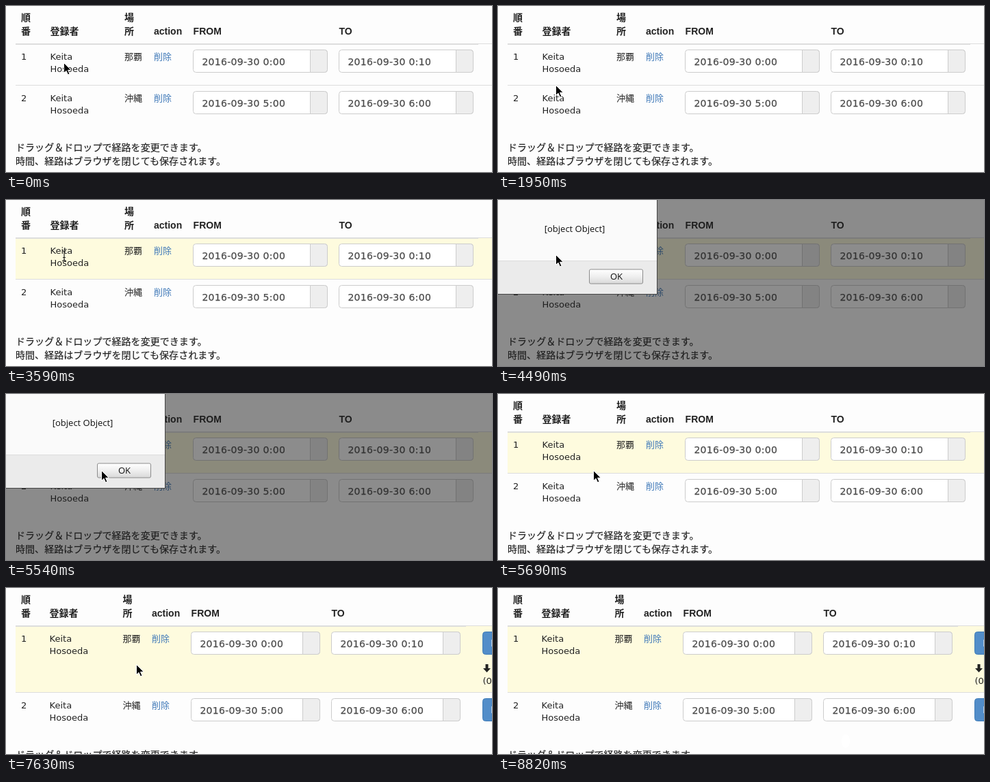
An HTML page for the animation above (9870 ms loop, 710 by 244 pixels).

```html
<!DOCTYPE html>
<html lang="ja">
<head>
<meta charset="utf-8">
<title>経路一覧</title>
<style>
html, body { margin: 0; width: 100%; height: 100%; overflow: hidden; background: #fdfdfd; }
svg { display: block; width: 710px; height: 244px; }
text { fill: #222; font: 13px "DejaVu Sans", "Noto Sans CJK JP", sans-serif; white-space: pre; }
.head { font: bold 14px "Liberation Sans", "Noto Sans CJK JP", sans-serif; }
.ja { font-family: "Noto Sans CJK JP", sans-serif; }
.note { font-size: 14px; letter-spacing: .05px; stroke: #222; stroke-width: .2px; }
.link { fill: #3f79b8; }
.time { fill: #4c4c4c; font-size: 14px; letter-spacing: .3px; stroke: #4c4c4c; stroke-width: .25px; }
.rule { fill: #ddd; }
.field { fill: #fff; stroke: #ccc; }
.addon { fill: #eee; stroke: #ccc; }
.button { fill: #528dc9; stroke: #3f7cb8; }
.mark { fill: #fefbde; }
.dialog text { font: 13px "Open Sans", "Noto Sans CJK JP", sans-serif; fill: #111; text-anchor: middle; }
.dialog .ja { font: 12px "Noto Sans CJK JP", sans-serif; text-anchor: end; }

#narrow, #wide, #narrow .mark, #dim, #first, #second, #cursor, #arrow, #beam, #halo {
  animation: 9870ms step-end infinite;
}
#narrow { animation-name: narrow; }
#wide { animation-name: wide; }
#narrow .mark { animation-name: mark; }
#dim { animation-name: dim; }
#first { animation-name: first; }
#second { animation-name: second; }
#cursor { animation-name: move; }
#arrow { animation-name: arrow; }
#beam { animation-name: beam; }
#halo { animation-name: halo; }

@keyframes narrow { 0% { opacity: 1 } 69.8%, 100% { opacity: 0 } }
@keyframes wide { 0% { opacity: 0 } 69.8%, 100% { opacity: 1 } }
@keyframes mark { 0% { opacity: 0 } 33.33%, 100% { opacity: 1 } }
@keyframes dim {
  0%, 57.64%, 77.3%, 100% { opacity: 0 }
  43.97%, 69.8% { opacity: 1 }
}
@keyframes first { 0%, 57.64%, 100% { opacity: 0 } 43.97% { opacity: 1 } }
@keyframes second { 0%, 77.3%, 100% { opacity: 0 } 69.8% { opacity: 1 } }
@keyframes arrow {
  0%, 16.71%, 40.93% { opacity: 1 }
  12.15%, 34.85%, 89.36%, 100% { opacity: 0 }
}
@keyframes beam {
  0%, 16.71%, 40.93%, 100% { opacity: 0 }
  12.15%, 34.85% { opacity: 1 }
}
@keyframes halo { 0% { opacity: 0 } 89.36%, 100% { opacity: 1 } }
@keyframes move {
  0% { transform: translate(84px, 83px) }
  12.15% { transform: translate(84px, 85px) }
  16.71% { transform: translate(84px, 92px) }
  18.23% { transform: translate(84px, 109px) }
  19.75% { transform: translate(84px, 116px) }
  22.79% { transform: translate(85px, 106px) }
  24.31% { transform: translate(89px, 84px) }
  25.83% { transform: translate(94px, 63px) }
  27.25% { transform: translate(95px, 56px) }
  30.29% { transform: translate(93px, 54px) }
  31.81% { transform: translate(90px, 59px) }
  33.33% { transform: translate(87px, 68px) }
  34.85% { transform: translate(85px, 79px) }
  36.37% { transform: translate(85px, 82px) }
  40.93% { transform: translate(84px, 80px) }
  53.09% { transform: translate(95px, 86px) }
  54.61% { transform: translate(124px, 103px) }
  56.13% { transform: translate(139px, 112px) }
  74.26% { transform: translate(160px, 112px) }
  75.78% { transform: translate(190px, 112px) }
  83.38% { transform: translate(197px, 114px) }
  84.9% { transform: translate(290px, 150px) }
  86.42% { transform: translate(410px, 192px) }
  87.84%, 100% { transform: translate(488px, 212px) }
}
</style>
</head>
<body>
<svg viewBox="0 0 710 244">
  <defs>
    <linearGradient id="face" x2="0" y2="1">
      <stop stop-color="#fff"/><stop offset=".5" stop-color="#efefef"/><stop offset="1" stop-color="#d9d9d9"/>
    </linearGradient>
  </defs>
  <g id="narrow"></g>
  <g id="wide"></g>
  <ellipse id="halo" cx="508" cy="225" rx="6" ry="10" fill="#fff"/>
  <rect id="dim" width="710" height="244" fill="#1a1a1a" fill-opacity=".5"/>
  <g id="first" class="dialog"></g>
  <g id="second" class="dialog"></g>
  <g id="cursor">
    <path id="arrow" d="M.5 .5V15.5L4 12.2 6.5 18 9 17 6.5 11.3H11.2Z" fill="#000" stroke="#fff" stroke-linejoin="round"/>
    <path id="beam" d="M-3-7.5Q0-7.5 0-5.5Q0-7.5 3-7.5M0-6V6M-3 7.5Q0 7.5 0 5.5Q0 7.5 3 7.5M-2 2.5H2" fill="none" stroke="#222" stroke-width="1.2"/>
  </g>
</svg>
<script>
const text = (x, y, s, cls = '') => `<text x="${x}" y="${y}" class="${cls}">${s}</text>`;
const rect = (x, y, w, h, cls, rx = 0) =>
  `<rect x="${x}" y="${y}" width="${w}" height="${h}" rx="${rx}" class="${cls}"/>`;

const rows = [
  { place: '那覇', times: ['2016-09-30 0:00', '2016-09-30 0:10'] },
  { place: '沖縄', times: ['2016-09-30 5:00', '2016-09-30 6:00'] },
];

function field(x, y, width, value) {
  const split = x + width - 26, right = x + width - .5;
  return rect(x + .5, y + .5, width - 1, 33, 'field', 4) +
    `<path class="addon" d="M${split + .5} ${y + .5}H${right - 4}q4 0 4 4v25q0 4-4 4H${split + .5}Z"/>` +
    text(x + 13.4, y + 23, value, 'time');
}

function routeButton(y) {
  return rect(696.5, y + .5, 40, 33, 'button', 4) +
    `<rect x="709" y="${y + 12}" width="1" height="10" fill="#fff" opacity=".6"/>`;
}

function page({ name, place, action, fields, width, rowHeight, ruleEnd, buttons }) {
  const bottom = 55 + rowHeight;
  let out = rect(14, 56, 696, rowHeight - 1, 'mark') +
    rect(14, 55, ruleEnd - 14, 2, 'rule') +
    rect(ruleEnd, 55, 710 - ruleEnd, 1, 'rule') +
    rect(14, bottom, 696, 1, 'rule');

  const heads = [[22, 22, '順'], [22, 42, '番'], [name, 42, '登録者'], [place, 22, '場'], [place, 42, '所'],
    [action, 42, 'action'], [fields[0] + .6, 42, 'FROM'], [fields[1] + .4, 42, 'TO']];
  out += heads.map(([x, y, s]) => text(x, y, s, 'head')).join('');

  rows.forEach((row, i) => {
    const top = i * rowHeight;
    out += text(22, top + 79, i + 1) +
      text(name, top + 79, 'Keita') + text(name, top + 97, 'Hosoeda') +
      text(place, top + 79, row.place, 'ja') +
      text(action, top + 79, '削除', 'ja link') +
      row.times.map((t, k) => field(fields[k], top + 64, width, t)).join('');
    if (buttons) out += routeButton(top + 64);
  });

  if (buttons) {
    out += '<path d="M700.5 112h4v6h3.5l-5.5 6-5.5-6h3.5Z" fill="#222"/>' + text(696.5, 141, '(0分)');
  }
  return out +
    text(14, bottom + 96.5, 'ドラッグ＆ドロップで経路を変更できます。', 'ja note') +
    text(14, bottom + 116.5, '時間、経路はブラウザを閉じても保存されます。', 'ja note');
}

function dialog(width, content) {
  const x = width - 99;
  return `<rect x="-5" y="-5" width="${width + 5.5}" height="143.5" fill="#fafafa" stroke="#444"/>
    <rect y="89" width="${width}" height="49" fill="#ebebeb"/>
    <rect y="89" width="${width}" height="1" fill="#dcdcdc"/>
    <rect x="${x + .5}" y="102" width="78" height="21" rx="2" fill="url(#face)" stroke="#8c8c8c"/>` +
    content + text(x + 40, 117, 'OK');
}

const fill = (id, html) => document.getElementById(id).innerHTML = html;
fill('narrow', page({ name: 64.6, place: 173, action: 216, fields: [273, 486], width: 197,
  rowHeight: 61, ruleEnd: 690 }));
fill('wide', page({ name: 63.6, place: 170.5, action: 213, fields: [270, 475], width: 189,
  rowHeight: 98, ruleEnd: 672, buttons: true }));
fill('first', dialog(232, text(112, 47, '[object Object]')));
fill('second', dialog(282, text(112, 32, 'OK') +
  text(260, 59, 'このページによる追加のダイアログ表示を抑止する', 'ja')));
</script>
</body>
</html>
```
